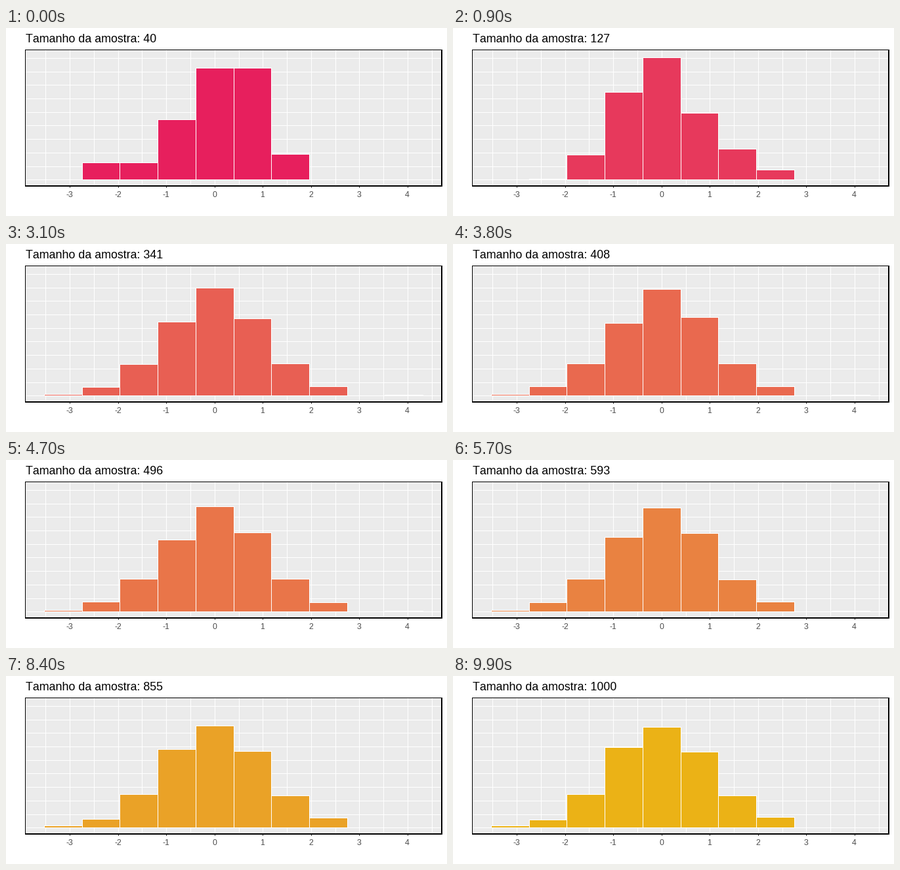
These frames come from a looping animation (672 px wide and 288 px high, 10 s). A matplotlib script:

```python
import numpy as np
import matplotlib.pyplot as plt
from matplotlib.animation import FuncAnimation
from matplotlib.patches import Rectangle

W, H, DPI = 672, 288, 100
FRAMES, INTERVAL = 100, 100
BASE = 232          # pixel row of zero density
BINS = 10
N_START, N_END = 40, 1000

plt.rcParams["font.family"] = "Liberation Sans"
plt.rcParams["text.kerning_factor"] = 6

# Key samples: size -> bar heights in pixels
SAMPLES = {
    40: [0, 26, 26, 92, 171, 171, 39, 0, 0, 0],
    127: [0, 0.7, 38, 134, 187, 102, 47, 15, 0, 0],
    496: [2.1, 15.3, 50, 109.6, 161.4, 121.4, 49.6, 14, 0, 1.1],
    1000: [3, 12.4, 51, 122.6, 154.4, 116.4, 49, 15.6, 0, 0.3],
}
SIZES = np.array(list(SAMPLES))
TOTALS = SIZES * np.array(list(SAMPLES.values())).T

PINK, GOLD = np.array([231, 31, 93]), np.array([235, 178, 22])
FADE = np.array([1, 0.715, 1.7])    # easing power per channel


def px(v):
    return int(np.floor(v + 0.5))


def bar_heights(n):
    """Bin totals grow evenly with the sample; heights are their share."""
    return [np.interp(n, SIZES, total) / n for total in TOTALS]


fig = plt.figure(figsize=(W / DPI, H / DPI), dpi=DPI, facecolor="white")
ax = fig.add_axes([0, 0, 1, 1])
ax.set_xlim(0, W)
ax.set_ylim(H, 0)
ax.axis("off")


def box(x0, y0, x1, y1, color, z):
    r = Rectangle((x0, y0), x1 - x0, y1 - y0, facecolor=color,
                  linewidth=0, antialiased=False, zorder=z)
    return ax.add_patch(r)


def label(x, y, s, size, color, ha):
    return ax.text(x, y, s, fontsize=size * 72 / DPI, color=color,
                   ha=ha, va="baseline", zorder=6)


# Panel, grid, ticks and border
L, T, R, B = 29, 33, 665, 243
box(L, T, R, B, "#ebebeb", 0)
for k in range(10):
    y = px(232.25 - 20.7 * k)
    box(L, y, R, y + 1, "white", 1)
for k in range(-7, 10):
    x = px(317.75 + 36.76 * k)
    box(x, T, x + 1, B, "white", 1)
    if k % 2 == 0:
        box(x, B, x + 1, B + 2, "#333333", 5)
        label(x - 0.4, 259, str(k // 2), 12.3, "#4d4d4d", "center")
box(L, T, R, T + 1, "black", 5)
box(L, T, L + 1, B, "black", 5)
box(R - 2, T, R, B, "black", 5)
box(L, B - 2, R, B, "black", 5)

# Bars: white outline with the fill inset by one pixel
edges = [px(58.05 + 57.7 * k) for k in range(BINS + 1)]
spans = list(zip(edges, edges[1:]))
outlines = [box(a, BASE, b + 1, BASE + 1, "white", 2) for a, b in spans]
fills = [box(a + 1, BASE, b, BASE, "white", 3) for a, b in spans]
title = label(29.5, 22, "", 17.88, "black", "left")


def draw(i):
    t = i / (FRAMES - 1)
    n = N_START + (N_END - N_START) * t
    title.set_text(f"Tamanho da amostra: {round(n)}")
    color = (PINK + (GOLD - PINK) * t ** FADE) / 255
    for outline, fill, h in zip(outlines, fills, map(px, bar_heights(n))):
        outline.set_y(BASE - h)
        outline.set_height(h + 1)
        fill.set_y(BASE - h + 1)
        fill.set_height(max(h - 1, 0))
        fill.set_visible(h > 1)
        fill.set_facecolor(color)
    return outlines + fills + [title]


anim = FuncAnimation(fig, draw, frames=FRAMES, interval=INTERVAL,
                     init_func=lambda: draw(0), repeat=True, repeat_delay=0)
plt.show()
```
